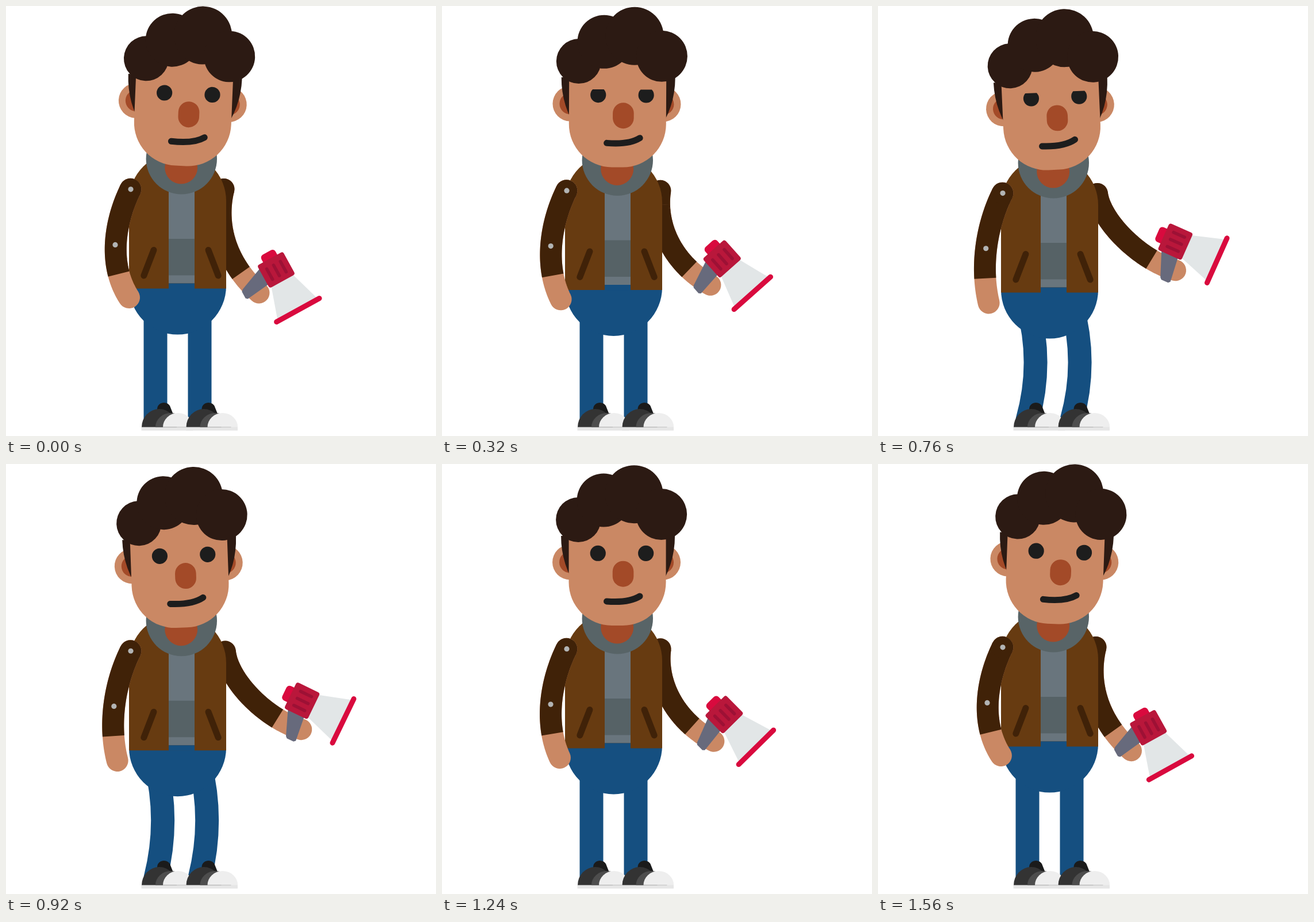
An HTML page with a canvas that plays this animation: 748x748 px, repeating every 1600 ms.

```html
<!DOCTYPE html>
<html lang="en">
<head>
<meta charset="utf-8">
<title>Man with megaphone</title>
<style>
  html, body { margin: 0; width: 100%; height: 100%; overflow: hidden; background: #fff; }
  canvas { display: block; width: 748px; height: 748px; }
</style>
</head>
<body>
<canvas id="stage" width="748" height="748"></canvas>
<script>
const ctx = document.getElementById('stage').getContext('2d');
const LOOP = 1600, STEP = 40, TAU = Math.PI * 2, RAD = Math.PI / 180;
const SKIN = '#ca8864', RUST = '#a34a28', HAIR = '#2c1a13', INK = '#1d1d1d';
const JACKET = '#673b11', SLEEVE = '#402208', JEANS = '#154f80';

const mix = (a, b, p) => a + (b - a) * p;
const mixPoint = (a, b, p) => [mix(a[0], b[0], p), mix(a[1], b[1], p)];

function shape(color, build) {
  ctx.fillStyle = color;
  ctx.beginPath();
  build();
  ctx.fill();
}
const disc = (color, x, y, r) => shape(color, () => ctx.arc(x, y, r, 0, TAU));
const box = (color, x, y, w, h, r = 0) => shape(color, () => ctx.roundRect(x, y, w, h, r));
const dome = (color, x, y, rx, ry) => shape(color, () => ctx.ellipse(x, y, rx, ry, 0, Math.PI, TAU));
const poly = (color, points) => shape(color, () => points.forEach(p => ctx.lineTo(...p)));

function stroke(color, width, cap, build) {
  ctx.strokeStyle = color;
  ctx.lineWidth = width;
  ctx.lineCap = cap;
  ctx.lineJoin = 'round';
  ctx.beginPath();
  build();
  ctx.stroke();
}
const line = (color, width, x1, y1, x2, y2) => stroke(color, width, 'round', () => {
  ctx.moveTo(x1, y1);
  ctx.lineTo(x2, y2);
});

function bezierAt([a, b, c, d], t) {
  const ab = mixPoint(a, b, t), bc = mixPoint(b, c, t), cd = mixPoint(c, d, t);
  return mixPoint(mixPoint(ab, bc, t), mixPoint(bc, cd, t), t);
}

// Bent arm: skin along the whole curve, sleeve up to the cuff.
function arm(curve, width, cuff) {
  const trace = end => () => {
    for (let i = 0; i <= 40; i++) ctx.lineTo(...bezierAt(curve, end * i / 40));
  };
  stroke(SKIN, width, 'round', trace(1));
  stroke(SLEEVE, width, 'butt', trace(cuff));
  disc(SLEEVE, ...curve[0], width / 2);
}

// Local x runs toward the horn's mouth, y across it.
function megaphone([x, y], angle) {
  ctx.save();
  ctx.translate(x, y);
  ctx.rotate(angle * RAD);
  poly('#676a7c', [[-36, -21], [-5, -21], [0, 22], [-3, 25], [-16, 25], [-19, 22]]);
  poly('#e2e6e7', [[1, -67], [59, -85], [59, -5], [1, -24]]);
  line('#d90a3e', 9, 59, -87.5, 59, -2.5);
  box('#d90a3e', -55, -60, 20, 28, 6);
  box('#b9173b', -43, -71, 45, 51, 4);
  for (const row of [-59, -45.5, -32]) line('#9d1135', 5.5, -30, row, -9, row);
  ctx.restore();
}

function rightArm(p) {
  const bump = 4 * p * (1 - p);
  const elbow = mixPoint([366, 370], [388, 375], p);
  const wrist = mixPoint([375, 440], [457, 442], p);
  const hand = mixPoint([440, 499], [518, 459.5], p);
  arm([
    mixPoint([379, 318.5], [381.5, 326.5], p),
    [elbow[0] - 2.5 * bump, elbow[1] + 8 * bump],
    [wrist[0] - 6 * bump, wrist[1] + 5 * bump],
    hand
  ], 37, mix(0.81, 0.775, p));
  megaphone(hand, mix(61.2, 23.8, p));
}

function leftArm(p) {
  arm([
    mixPoint([216.5, 318.8], [216.5, 325.7], p),
    mixPoint([189, 375], [188, 383], p),
    mixPoint([177, 450], [178, 455], p),
    mixPoint([214, 507], [192.5, 516.5], p)
  ], 38, 0.775);
  disc('#b2b4b4', 217, mix(318.8, 325.6, p), 4.6);
  disc('#b2b4b4', mix(190, 187.7, p), mix(415.4, 421.8, p), 4.6);
}

function leg(x, dy, bend) {
  stroke(JEANS, 41, 'butt', () => {
    ctx.moveTo(x, 500 + dy);
    ctx.lineTo(x, 520);
    ctx.quadraticCurveTo(x + 2 * bend, 620, x, 720);
    ctx.lineTo(x - 0.5, 734);
  });
}

function shoe(x) {
  ctx.save();
  ctx.translate(x, 0);
  shape('#1b1b1b', () => {
    ctx.moveTo(262, 712);
    ctx.lineTo(263, 701);
    ctx.bezierCurveTo(264, 687, 283, 687, 286, 698);
    ctx.lineTo(292, 713);
  });
  box('#e6e6e6', 235.5, 732, 90, 6.5);
  dome('#333333', 266.5, 732.5, 30.5, 31.5);
  dome('#4d4d4d', 287, 732.5, 27, 24.5);
  dome('#eeeeee', 299.3, 732.5, 26.3, 24.5);
  ctx.restore();
}

function torso(dy) {
  ctx.save();
  ctx.translate(0, dy);
  disc(JEANS, 298.5, 487, 84.5);
  shape(JACKET, () => {
    ctx.arc(298.5, 339, 84.5, Math.PI, TAU);
    ctx.lineTo(383, 491.5);
    ctx.lineTo(214, 491.5);
  });
  box('#69757d', 283, 300, 45, 182.5);
  box('#566266', 283, 405, 45, 63.5);
  box(JEANS, 283, 482.5, 45, 9.5);
  line(SLEEVE, 11, 257, 424.5, 239.8, 469);
  line(SLEEVE, 11, 352, 424.5, 369.2, 469);
  disc('#586467', 305.3, 265.8, 61.7);
  disc(RUST, 304.7, 281, 28.5);
  ctx.restore();
}

function eye(x, y, r, cover) {
  const lid = Math.asin(Math.min(1, cover / r - 1));
  shape(INK, () => ctx.arc(x, y, r, lid, Math.PI - lid));
}

function head(dy, angle, cover) {
  ctx.save();
  ctx.translate(305, 261 + dy - 3);
  ctx.rotate(angle * RAD);
  ctx.translate(-305, -261);
  for (const x of [222.5, 384.5]) {
    disc(SKIN, x, 171, 30.5);
    disc(RUST, x, 171, 18.5);
  }
  shape(HAIR, () => ctx.ellipse(306, 125, 99, 129, 0, 0, Math.PI));
  box(SKIN, 220.5, 90, 169, 191, [0, 0, 75, 75]);
  disc(HAIR, 237, 97, 39);
  disc(HAIR, 281, 63, 46.5);
  disc(HAIR, 334, 52.7, 50.5);
  disc(HAIR, 381.5, 87.5, 44.5);
  eye(271.2, 155.3, 13.6, cover);
  eye(354.6, 155.3, 13.6, cover);
  box(RUST, 296.7, 168.7, 36.6, 45, 18.3);
  stroke(INK, 11, 'round', () => {
    ctx.moveTo(286.5, 239);
    ctx.quadraticCurveTo(325, 242, 344, 230);
  });
  ctx.restore();
}

function draw(time) {
  const sway = 1 - Math.abs(1 - time / (LOOP / 2));
  const p = (1 - Math.cos(TAU * time / LOOP)) / 2;
  const dy = 7.1 * p;
  const bend = 28.5 * Math.max(0, p - 0.5);
  const cover = 26 * Math.max(0, 1 - Math.abs(time - 541) / 262);

  ctx.fillStyle = '#fff';
  ctx.fillRect(0, 0, 748, 748);
  rightArm(p);
  leg(260, dy, bend);
  leg(337, dy, bend);
  shoe(0);
  shoe(77.5);
  torso(dy);
  leftArm(p);
  head(dy, 2.4 - 5.25 * sway, cover);
}

const start = performance.now();
function tick() {
  const time = (performance.now() - start) % LOOP;
  draw(Math.floor(time / STEP) * STEP);
  requestAnimationFrame(tick);
}
tick();
</script>
</body>
</html>
```
